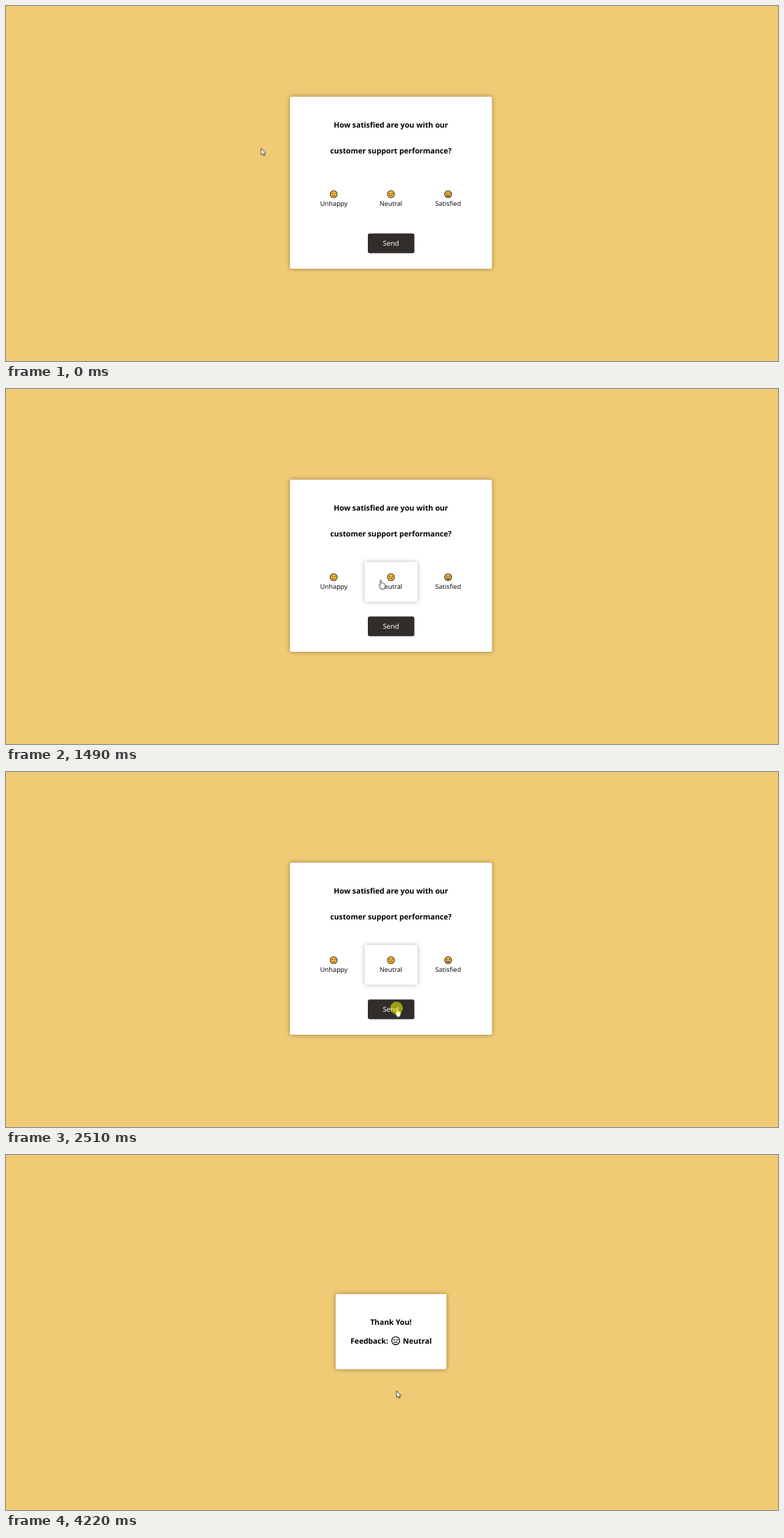
Recreate the animation shown at these times as an HTML page. Size 1103x508 px, loop 4.52 s.

```html
<!DOCTYPE html>
<html lang="en">
<head>
<meta charset="utf-8">
<title>Feedback form</title>
<style>
  html, body { margin: 0; width: 100%; height: 100%; overflow: hidden; background: #f0ca75; }
  svg { display: block; width: 1103px; height: 508px; }

  text {
    font: 9.25px "Noto Sans", "Open Sans", sans-serif;
    text-anchor: middle;
    text-rendering: geometricPrecision;
    fill: #111;
  }
  .bold { font-size: 10.74px; font-weight: 700; fill: #000; }
  .send { font-size: 9.85px; fill: #fff; }
  .start { text-anchor: start; }

  .card { fill: #fff; filter: drop-shadow(0 0 3.3px rgba(0, 0, 0, .38)); }
  .choice { fill: #fff; filter: drop-shadow(0 0 3.3px rgba(0, 0, 0, .3)); }
  .button { fill: #302d2b; }

  .face { fill: #fbb935; stroke: #40321f; stroke-width: 1.1; }
  .line { fill: none; stroke: #40321f; stroke-width: .9; stroke-linecap: round; }
  .dot { fill: #40321f; }
  .outline { fill: none; stroke: #111; stroke-width: 1.3; stroke-linecap: round; }
  .pointer { fill: #fff; stroke: #222; stroke-width: .8; stroke-linejoin: round; }

  .survey, .thanks, .choice, .pointers, .arrow, .hand, .click {
    animation: 4520ms step-end infinite;
  }
  .survey { animation-name: survey; }
  .thanks { animation-name: thanks; }
  .choice { animation-name: choice; }
  .pointers { animation-name: travel; }
  .arrow { animation-name: arrow; }
  .hand { animation-name: hand; }
  .click { fill: #ff0; fill-opacity: .53; animation-name: click; }

  @keyframes survey { 0% { visibility: visible } 57.743%, 100% { visibility: hidden } }
  @keyframes thanks { 0% { visibility: hidden } 57.743%, 100% { visibility: visible } }
  @keyframes choice {
    0% { visibility: hidden }
    17.478% { visibility: visible }
    57.743%, 100% { visibility: hidden }
  }
  @keyframes travel {
    0% { transform: translate(364.6px, 203.5px) }
    8.186% { transform: translate(372px, 206px) }
    10.841% { transform: translate(400px, 214px) }
    13.053% { transform: translate(444px, 226px) }
    15.265% { transform: translate(494px, 240px) }
    17.478% { transform: translate(529px, 257px) }
    19.69% { transform: translate(542.3px, 271.6px) }
    21.903% { transform: translate(542px, 272px) }
    32.965% { transform: translate(535.4px, 273.3px) }
    37.389% { transform: translate(538px, 280px) }
    39.602% { transform: translate(546px, 297px) }
    41.814% { transform: translate(551px, 310px) }
    44.027% { transform: translate(555px, 326px) }
    46.239% { transform: translate(558px, 333px) }
    51.106% { transform: translate(558px, 336px) }
    53.319%, 100% { transform: translate(558px, 337.3px) }
  }
  @keyframes arrow {
    0% { visibility: visible }
    17.478% { visibility: hidden }
    41.814% { visibility: visible }
    44.027% { visibility: hidden }
    57.743%, 100% { visibility: visible }
  }
  @keyframes hand {
    0% { visibility: hidden }
    17.478% { visibility: visible }
    41.814% { visibility: hidden }
    44.027% { visibility: visible }
    57.743%, 100% { visibility: hidden }
  }
  @keyframes click {
    0% { visibility: hidden }
    24.115% { visibility: visible }
    26.327% { visibility: hidden }
    55.531% { visibility: visible }
    57.743% { visibility: hidden }
    91.15% { visibility: visible }
    93.363%, 100% { visibility: hidden }
  }
</style>
</head>
<body>
<svg viewBox="0 0 1103 508">
  <g class="survey">
    <rect class="card" x="405.7" y="129.7" width="288.6" height="246.3" rx="2.7"/>
    <text class="bold" x="550" y="173.8">How satisfied are you with our</text>
    <text class="bold" x="550" y="211.3">customer support performance?</text>

    <rect class="choice" x="512.5" y="247.5" width="75.5" height="57" rx="1.5"/>

    <g transform="translate(468.2 269.3)">
      <circle class="face" r="5"/>
      <path class="line" d="M-2.6 -1.1h1.2M1.4 -1.1h1.2M-1.7 2.4Q0 1.2 1.7 2.4"/>
    </g>
    <g transform="translate(550 269.3)">
      <circle class="face" r="5"/>
      <path class="line" d="M-2.6 -1h1.3M1.3 -1h1.3M-1.9 1.7h3.8"/>
    </g>
    <g transform="translate(631.7 269.3)">
      <circle class="face" r="5"/>
      <circle class="dot" cx="-1.8" cy="-1.4" r=".8"/>
      <circle class="dot" cx="1.8" cy="-1.4" r=".8"/>
      <path class="dot" d="M-3 .5h6a3 3 0 0 1 -6 0z"/>
      <path d="M-2.2 .8h4.4v.8h-4.4z" fill="#fff"/>
    </g>
    <text x="468.4" y="286.2">Unhappy</text>
    <text x="550" y="286.2">Neutral</text>
    <text x="631.7" y="286.2">Satisfied</text>

    <rect class="button" x="517" y="325.5" width="66.5" height="28.3" rx="2.7"/>
    <text class="send" x="550" y="343.4">Send</text>
  </g>

  <g class="thanks">
    <rect class="card" x="471" y="199" width="158.3" height="107.5" rx="2.7"/>
    <text class="bold" x="550" y="243">Thank You!</text>
    <text class="bold start" x="492.2" y="269.7">Feedback:</text>
    <g class="outline" transform="translate(556.8 265.8)">
      <circle r="5.7"/>
      <path d="M-3 -1.1h1.8M1.2 -1.1h1.8M-2.3 2.1h4.6"/>
    </g>
    <text class="bold start" x="567" y="269.7">Neutral</text>
  </g>

  <g class="pointers">
    <path class="pointer arrow" d="M0 0V9.6L2.2 7.7L3.7 10.9L5.1 10.3L3.7 7.2H6.6Z"/>
    <path class="pointer hand" d="M-.9 .8Q-.9 0 0 0T.9 .8V4.4Q2 3.9 2.7 4.8Q3.8 4.3 4.5 5.3Q6.2 5 6.2 6.6V9.2Q6.1 10.6 5 11.7V13.2H.4V12.2L-2.2 8.6Q-2.9 7.4 -2 7Q-1.4 6.8 -.9 7.6Z"/>
    <circle class="click" cy=".3" r="9"/>
  </g>
</svg>
</body>
</html>
```
